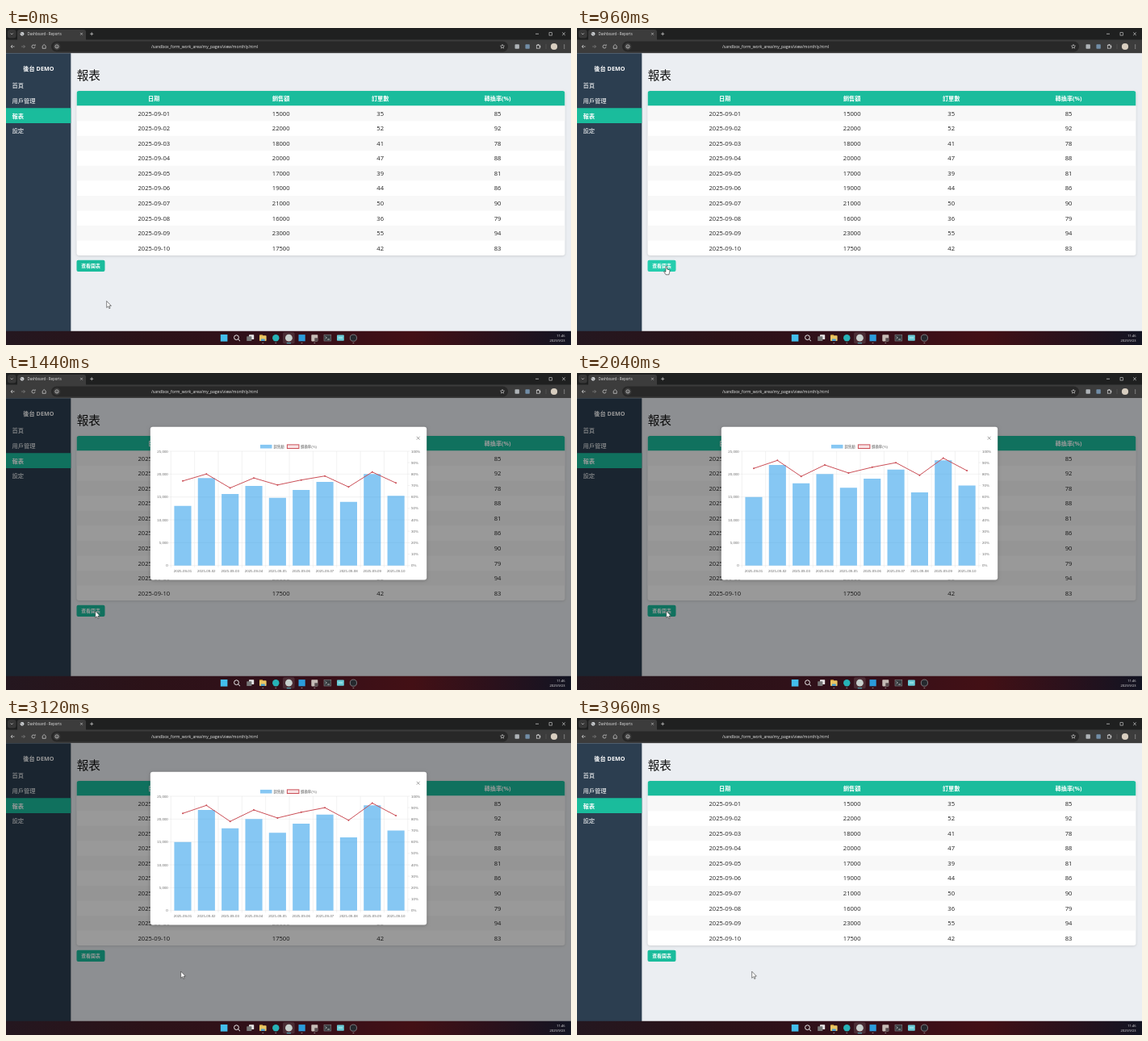
An HTML page with a canvas for the animation above (4080 ms loop, 700 by 393 pixels).

```html
<!DOCTYPE html>
<html lang="zh-Hant">
<head>
<meta charset="utf-8">
<title>Dashboard - Reports</title>
<style>
html, body { margin: 0; width: 100%; height: 100%; overflow: hidden; background: #ebeef2; }
canvas { display: block; width: 700px; height: 393px; }
</style>
</head>
<body>
<canvas id="stage"></canvas>
<script>
const W = 700, H = 393, LOOP = 4080, STEP = 120;
const OPEN = 1080, CLOSE = 3240, CHART_START = 1040, CHART_MS = 1000;
const UI = '"Open Sans", "Noto Sans CJK TC", "Noto Sans CJK JP", sans-serif';
const CHART = '"Liberation Sans", "Noto Sans CJK TC", "Noto Sans CJK JP", sans-serif';
const GREEN = '#1abc9c';
const sales = [15000, 22000, 18000, 20000, 17000, 19000, 21000, 16000, 23000, 17500];
const orders = [35, 52, 41, 47, 39, 44, 50, 36, 55, 42];
const rates = [85, 92, 78, 88, 81, 86, 90, 79, 94, 83];
const dates = sales.map((_, i) => '2025-09-' + String(i + 1).padStart(2, '0'));

const canvas = document.getElementById('stage');
const scale = Math.max(1, window.devicePixelRatio || 1);
canvas.width = W * scale;
canvas.height = H * scale;
const ctx = canvas.getContext('2d');
ctx.scale(scale, scale);

function rect(x, y, w, h, color, radius = 0) {
  ctx.fillStyle = color;
  ctx.beginPath();
  ctx.roundRect(x, y, w, h, radius);
  ctx.fill();
}

function circle(x, y, r, color) {
  ctx.fillStyle = color;
  ctx.beginPath();
  ctx.arc(x, y, r, 0, Math.PI * 2);
  ctx.fill();
}

function ring(x, y, r, color, width = 0.7, from = 0, to = Math.PI * 2) {
  ctx.strokeStyle = color;
  ctx.lineWidth = width;
  ctx.beginPath();
  ctx.arc(x, y, r, from, to);
  ctx.stroke();
}

function box(x, y, w, h, color, width = 0.7) {
  ctx.strokeStyle = color;
  ctx.lineWidth = width;
  ctx.strokeRect(x, y, w, h);
}

function line(points, color, width = 0.7) {
  ctx.strokeStyle = color;
  ctx.lineWidth = width;
  ctx.beginPath();
  points.forEach(([x, y]) => ctx.lineTo(x, y));
  ctx.stroke();
}

function cross(x, y, r, color, width = 0.7) {
  line([[x - r, y - r], [x + r, y + r]], color, width);
  line([[x - r, y + r], [x + r, y - r]], color, width);
}

// Text whose capitals are centred on y.
function text(str, x, y, size, color, align = 'left', weight = 400, family = UI) {
  ctx.font = `${weight} ${size}px ${family}`;
  ctx.fillStyle = color;
  ctx.textAlign = align;
  ctx.fillText(str, x, y + size * 0.36);
}

function withShadow(blur, alpha, draw) {
  ctx.save();
  ctx.shadowColor = `rgba(0,0,0,${alpha})`;
  ctx.shadowBlur = blur * scale;
  ctx.shadowOffsetY = 0.7 * scale;
  draw();
  ctx.restore();
}

function drawBrowser() {
  const ink = '#d8d8d8';
  rect(0, 0, W, 15, '#1f2020');
  rect(2, 2, 10.5, 10.5, '#383838', 3);
  line([[5.7, 6.5], [7.2, 8], [8.7, 6.5]], ink);
  rect(14, 2, 85, 16, '#3c3c3c', 3);
  circle(20, 7.3, 2.4, '#cfd2d5');
  line([[18, 6.4], [20, 7.6], [21.5, 9]], '#555', 0.6);
  text('Dashboard - Reports', 26.5, 7.3, 4.4, '#e4e4e4');
  cross(93.5, 7.3, 1.4, ink, 0.6);
  line([[104.2, 7.3], [108.2, 7.3]], ink);
  line([[106.2, 5.3], [106.2, 9.3]], ink);
  line([[656, 7.3], [660, 7.3]], ink);
  box(673, 5.7, 3.4, 3.4, ink, 0.6);
  cross(691, 7.3, 1.8, ink);

  rect(0, 14.6, W, 16.8, '#3c3c3c');
  line([[10.5, 23], [6, 23]], ink);
  line([[8, 21], [6, 23], [8, 25]], ink);
  line([[19, 23], [23.5, 23]], '#858585');
  line([[21.5, 21], [23.5, 23], [21.5, 25]], '#858585');
  ring(34, 23, 2, ink, 0.7, 0.2, 5.2);
  line([[34.8, 21.8], [36.2, 21.8], [36.2, 20.3]], ink);
  line([[45.2, 25.3], [45.2, 22.3], [47.2, 20.5], [49.2, 22.3], [49.2, 25.3], [45.2, 25.3]], ink);
  rect(56, 16.6, 566, 12.8, '#282828', 6.4);
  circle(63, 23, 4.4, '#3c3c3c');
  ring(63, 23, 2.1, ink);
  line([[63, 22.8], [63, 24.2]], ink);
  text('/sandbox_form_work_area/my_pages/view/monthly.html', 180, 23, 5, '#e8e8e8');

  const star = Array.from({ length: 11 }, (_, i) => {
    const r = i % 2 ? 1.2 : 2.6, a = i * Math.PI / 5 - Math.PI / 2;
    return [615 + r * Math.cos(a), 23 + r * Math.sin(a)];
  });
  line(star, ink, 0.6);
  rect(630.5, 20.3, 5.4, 5.4, '#aeb3b7', 0.8);
  rect(643.4, 20.3, 5.4, 5.4, '#718da6', 0.8);
  box(657.3, 21.2, 4, 4, ink);
  circle(659.3, 20.8, 0.9, ink);
  circle(661.5, 23.2, 0.9, ink);
  line([[669, 20], [669, 26]], '#606060', 0.5);
  circle(679, 23, 4.1, '#d8cec0');
  for (const dy of [-2, 0, 2]) circle(691.7, 23 + dy, 0.55, ink);
}

function drawPage(hover) {
  rect(0, 31.3, W, 345, '#ebeef2');
  withShadow(2, 0.15, () => rect(0, 31.3, 80.3, 345, '#2c3e50'));
  text('後台 DEMO', 40.4, 50, 7.2, '#fff', 'center', 700);
  rect(0, 99.2, 80.3, 18.7, GREEN);
  ['首頁', '用戶管理', '報表', '設定'].forEach((label, i) =>
    text(label, 7.5, 71.7 + 18.6 * i, 7.25, '#fff', 'left', i === 2 ? 700 : 400));

  text('報表', 87.7, 59, 14.6, '#111', 'left', 500);

  const centres = [183.3, 340.7, 463.7, 609];
  withShadow(3, 0.15, () => rect(87.5, 78, 605, 204, '#fff', 3));
  ctx.save();
  ctx.beginPath();
  ctx.roundRect(87.5, 78, 605, 204, 3);
  ctx.clip();
  rect(87.5, 78, 605, 18.6, GREEN);
  ['日期', '銷售額', '訂單數', '轉換率(%)'].forEach((label, i) =>
    text(label, centres[i], 87.4, 7.2, '#fff', 'center', 700));
  dates.forEach((date, i) => {
    const y = 96.6 + 18.55 * i;
    if (i % 2 === 0) rect(87.5, y, 605, 18.55, '#f8f8f8');
    [date, sales[i], orders[i], rates[i]].forEach((value, c) =>
      text(String(value), centres[c], y + 9.4, 7.6, '#222', 'center'));
  });
  ctx.restore();

  rect(87.5, 287.8, 35, 14.3, hover ? '#25cdae' : GREEN, 2);
  text('查看圖表', 105, 295, 5.9, '#fff', 'center', 700);
}

function drawChart(progress) {
  const left = 204.3, right = 497.8, top = 97, base = 238.7;
  const height = base - top, slot = (right - left) / 10, barWidth = slot * 0.72;
  const ink = '#666', grid = '#e3e3e3';
  const label = (str, x, y, align) => text(str, x, y, 4.4, ink, align, 400, CHART);
  const centre = i => left + slot * (i + 0.5);

  for (let i = 0; i <= 10; i++) {
    const x = left + slot * i, y = base - height * i / 10;
    line([[x, top], [x, base + 2.6]], grid, 0.45);
    line([[right, y], [right + 2.6, y]], grid, 0.45);
    label(i * 10 + '%', 502, y, 'left');
    if (i % 2 === 0) {
      line([[left - 2.6, y], [right, y]], grid, 0.45);
      label((i * 2500).toLocaleString('en-US'), 200.8, y, 'right');
    }
  }

  sales.forEach((value, i) => {
    const h = height * value / 25000 * progress;
    rect(centre(i) - barWidth / 2, base - h, barWidth, h, 'rgba(54,162,235,0.6)');
    label(dates[i], centre(i), 245, 'center');
  });

  const red = '#cb4f57';
  const points = rates.map((rate, i) => [centre(i), base - height * rate / 100 * progress]);
  line(points, red, 1);
  points.forEach(([x, y]) => circle(x, y, 1, red));

  rect(315, 88.9, 14.5, 4.6, '#86c7f3');
  label('銷售額', 331.5, 91.2, 'left');
  rect(348.4, 88.9, 14.5, 4.6, '#f8e4e5');
  box(348.4, 88.9, 14.5, 4.6, red, 1);
  label('轉換率(%)', 365, 91.2, 'left');
}

function drawModal(time) {
  const t = Math.min(1, Math.max(0, (time - CHART_START) / CHART_MS));
  rect(0, 31.3, W, 345, 'rgba(0,0,0,0.4)');
  withShadow(4, 0.25, () => rect(178.8, 66.8, 342.4, 189.7, '#fff', 3));
  cross(510.7, 80.7, 1.9, '#888', 0.8);
  drawChart(1 - (1 - t) ** 4);
}

function drawTaskbar() {
  const fade = ctx.createLinearGradient(0, 0, W, 0);
  [[0, '#24171f'], [0.25, '#2c1218'], [0.5, '#33101a'], [0.72, '#431015'], [0.87, '#2a111c'], [1, '#121422']]
    .forEach(([at, color]) => fade.addColorStop(at, color));
  rect(0, 375.8, W, 17.2, fade);

  rect(343, 377.3, 14.6, 14, 'rgba(255,255,255,0.12)', 2);
  rect(265.8, 380, 8.6, 8.6, '#43bdeb');
  ring(285.5, 383.7, 2.9, '#eee', 1);
  line([[287.6, 385.8], [290, 388.2]], '#eee', 1);
  rect(301, 380.2, 6.2, 5.8, '#e8e8e8', 0.6);
  rect(298.2, 382.3, 6.2, 5.8, '#777', 0.6);
  rect(314, 380.2, 4.2, 3, '#d9a336', 0.7);
  rect(314, 381.3, 8.6, 6.8, '#eac563', 0.8);
  rect(315.8, 385.4, 5, 2.7, '#4b9fce', 0.5);
  circle(334.3, 384.3, 4.2, '#27b2b6');
  circle(350.4, 384.2, 4.4, '#c8d0cd');
  rect(362.5, 380.1, 8.2, 8.2, '#2b9bda');
  rect(378.3, 380.2, 8, 8.2, '#c6bbb5', 0.8);
  rect(382.3, 384.3, 4, 4.1, '#594e50');
  rect(394, 380.4, 8.8, 7.6, '#35393d', 0.8);
  box(394, 380.4, 8.8, 7.6, '#92979a', 0.5);
  line([[395.7, 382.4], [397.3, 384], [395.7, 385.6]], '#eee');
  line([[398.2, 386], [401, 386]], '#eee');
  rect(410, 380.5, 8.8, 7.2, '#67c9d4', 0.8);
  line([[411.8, 384], [417, 384]], '#e9ffff');
  circle(430.4, 384.2, 4.3, '#25282d');
  ring(430.4, 384.2, 4.1, '#aeb2b5', 0.6);

  for (const x of [318.3, 334.3, 366.5, 382.3, 430.4]) rect(x - 1, 390.3, 2, 0.8, '#aaa', 0.4);
  rect(347.6, 390.2, 5.6, 1, '#58c7d5', 0.5);
  text('11:46', 692.5, 381.3, 4, '#eee', 'right');
  text('2025/9/23', 692.5, 387.2, 4, '#eee', 'right');
}

function polygon(points, width) {
  ctx.fillStyle = '#fff';
  ctx.strokeStyle = '#222';
  ctx.lineWidth = width;
  ctx.beginPath();
  points.forEach(([x, y]) => ctx.lineTo(x, y));
  ctx.closePath();
  ctx.fill();
  ctx.stroke();
}

function drawPointer(x, y, hand) {
  ctx.save();
  ctx.translate(x, y);
  ctx.lineJoin = 'round';
  if (hand) {
    polygon([[-0.8, 0.4], [0, 0], [0.8, 0.4], [0.9, 3.8], [3.8, 4.6], [4.4, 5.6], [3.8, 8.2],
      [3.2, 10.6], [-0.6, 10.6], [-3, 7], [-2.6, 6.2], [-0.8, 7.2]], 0.6);
  } else {
    polygon([[0, 0], [0, 8.2], [1.9, 6.5], [3.2, 9.3], [4.4, 8.7], [3.2, 6], [5.7, 5.9]], 0.55);
  }
  ctx.restore();
}

function glide(time, start, end) {
  const t = Math.min(1, Math.max(0, (time - start) / (end - start)));
  return t * t * (3 - 2 * t);
}

function pointerAt(time) {
  const toButton = glide(time, 240, 840), away = glide(time, 2280, 3000);
  return [
    124.7 - 14 * toButton + 106 * away,
    338.5 - 43.3 * toButton + 19 * away
  ];
}

function render(time) {
  const [x, y] = pointerAt(time);
  const open = time >= OPEN && time < CLOSE;
  const hover = !open && x > 87.5 && x < 122.5 && y > 287.8 && y < 302.1;
  drawBrowser();
  drawPage(hover);
  if (open) drawModal(time);
  drawTaskbar();
  drawPointer(x, y, hover);
}

function tick() {
  const time = performance.now() % LOOP;
  render(Math.floor(time / STEP) * STEP);
  requestAnimationFrame(tick);
}
tick();
</script>
</body>
</html>
```
